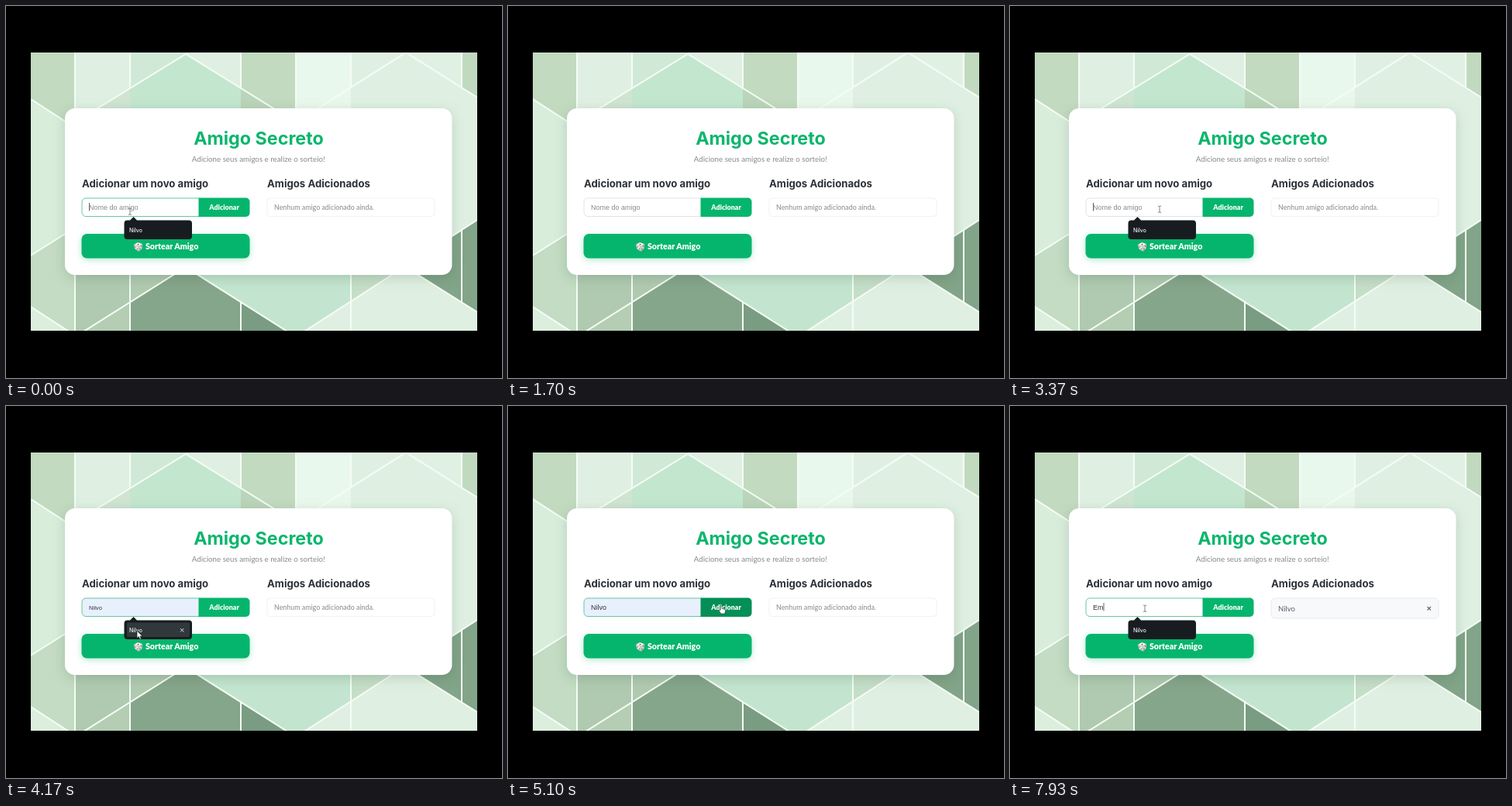
These frames come from a looping animation (640 px wide and 480 px high, 8000 ms). An HTML page:

```html
<!DOCTYPE html>
<html lang="pt">
<head>
<meta charset="utf-8">
<title>Amigo Secreto</title>
<style>
  html, body { margin: 0; width: 100%; height: 100%; overflow: hidden; background: #000; }
  svg { display: block; width: 640px; height: 480px; }
  text { font-family: Lato, sans-serif; white-space: pre; }
  .head { font: 700 13.2px Inter, sans-serif; fill: #2d3238; }
  .field { font: 9px "Liberation Sans", Arial, sans-serif; }
  .bold { font-weight: 900; fill: #fff; }
  #card { filter: drop-shadow(0 4px 8px #1b40282e); }
  #draw { filter: drop-shadow(0 2px 4px #06b56d50); }
</style>
</head>
<body>
<svg viewBox="0 0 640 480">
  <clipPath id="screen"><path d="M32 60H608V419H32Z"/></clipPath>
  <g clip-path="url(#screen)">
    <g id="wall"></g>
    <path fill="none" stroke="#f5fcf5" stroke-width="2" d="M89 60V420M160 60V106M160 347V420M303 60V106M303 381V420M374 60V150M445 60V105M445 340V420M588 60V106M588 289V383
      M32 120L89 157M89 150L232 62L374 150L516 60L608 118M32 322L89 286
      M89 427L232 337L374 427L608 276M32 388L89 425M516 337L608 395"/>

    <rect id="card" x="76" y="132" width="499.500" height="215" rx="13" fill="#fff"/>
    <text x="326" y="179" text-anchor="middle" style="font:700 23.300px Inter,sans-serif" fill="#0bb56d">Amigo Secreto</text>
    <text x="325.700" y="201" text-anchor="middle" font-size="9.750" fill="#858a8d">Adicione seus amigos e realize o sorteio!</text>
    <text class="head" x="98" y="234">Adicionar um novo amigo</text>
    <text class="head" x="337" y="234">Amigos Adicionados</text>

    <path id="input" d="M249 248H103a5 5 0 0 0-5 5v13.500a5 5 0 0 0 5 5H249"/>
    <text id="value" class="field" x="107" y="262.500"></text>
    <path id="caret" stroke="#666" stroke-width="1" d="M0 254V264.500"/>
    <path id="add" d="M248.500 247.500h61a5 5 0 0 1 5 5v14.500a5 5 0 0 1-5 5h-61z"/>
    <text class="bold" x="281.500" y="263" text-anchor="middle" font-size="8.900">Adicionar</text>

    <rect id="draw" x="97.500" y="294" width="217" height="31.500" rx="7" fill="#06b56d"/>
    <g stroke="#9aa6a3" stroke-width=".4">
      <path fill="#fff" d="M165 308l5-3 6 2-5 3.500z"/>
      <path fill="#e4e8e7" d="M165 308l6 2.500.5 6-5-3z"/>
      <path fill="#ced6d4" d="M171 310.500l5-3.500-.5 6-4 3.500z"/>
    </g>
    <g fill="#a8414b">
      <circle cx="170.500" cy="307.700" r="1"/><circle cx="167" cy="311" r=".7"/><circle cx="169.500" cy="313.500" r=".7"/>
      <circle cx="173" cy="313.500" r=".7"/><circle cx="174.500" cy="310" r=".7"/>
    </g>
    <text class="bold" x="180" y="314" font-size="10.600">Sortear Amigo</text>

    <g id="empty">
      <rect x="337" y="248" width="216" height="23.500" rx="4" fill="#fff" stroke="#f0f2f3"/>
      <text x="346" y="263" font-size="8.900" fill="#84898d">Nenhum amigo adicionado ainda.</text>
    </g>
    <g id="item">
      <rect x="337" y="248" width="216" height="26" rx="5" fill="#f8f9fa" stroke="#e7eaed"/>
      <text x="346" y="264.500" font-size="9.500" fill="#5c6166">Nilvo</text>
      <path stroke="#666c72" stroke-width="1.200" d="M538.500 259l4.500 4.500m0-4.500l-4.500 4.500"/>
    </g>

    <g id="popup">
      <path fill="#171c20" d="M156.500 276.500h3.500l4.500-4.500 4.500 4.500h67a4 4 0 0 1 4 4v16.500a4 4 0 0 1-4 4h-79.500a4 4 0 0 1-4-4v-16.500a4 4 0 0 1 4-4z"/>
      <g id="row">
        <rect x="156" y="279.500" width="81" height="18.500" rx="2" fill="#30383b"/>
        <path stroke="#d8dcde" d="M225 287l4.500 4.500m0-4.500l-4.500 4.500"/>
      </g>
      <text x="159" y="291.500" style="font:500 7px Inter,sans-serif" fill="#f2f4f5">Nilvo</text>
    </g>

    <g id="cursor">
      <path id="arrow" fill="#fff" stroke="#222" stroke-width=".7" d="M0 0V9.500L2.200 7.500 3.800 11 5.500 10.200 4 7H7Z"/>
      <path id="beam" fill="none" stroke="#777" stroke-width=".9" d="M-2-4Q0-4 0-3Q0-4 2-4M0-3V4M-2 4.500Q0 4.500 0 3.500Q0 4.500 2 4.500"/>
      <path id="hand" fill="#fff" stroke="#333" stroke-width=".6" d="M-1 0Q0-1.300 1 0V3.500L5 4.500Q6 5 5.500 7L4.500 10H0L-3 6Q-3 4.500-1 5.500Z"/>
    </g>
  </g>
</svg>
<script>
const $ = id => document.getElementById(id);
const LOOP = 8000, NAME = "Nilvo";

// Wallpaper panes: colour, then outline.
$("wall").innerHTML = `
  #dff0e2 M32 60H608V420H32Z
  #c2dabf M32 60H89V157L32 120Z
  #d0e9d6 M160 60H232V160H160Z
  #dff0e2 M232 60H303V160H232Z
  #c2dabf M303 60H374V150H303Z
  #e9f8ed M374 60H445V150H374Z
  #e0f1e3 M516 60H588V106Z
  #c1dabf M588 60H608V118L588 106Z
  #c3e6cf M89 150L232 62L374 150Z
  #cfe5d1 M89 150L160 106V150Z
  #bad5ba M303 106L374 150H303Z
  #d9eddb M32 120L89 157V286L32 322Z
  #c3dcc3 M32 322L89 286V420H32Z
  #afcab0 M89 286H160V420H89Z
  #b0cab0 M160 286H232V420H160Z
  #c3e5cf M232 337H445V420H232Z
  #c5dec8 M445 337H516V420H445Z
  #86a68b M160 382L232 337L374 427H160Z
  #b4cdb3 M89 427L160 382V427Z
  #7a9c82 M303 382L374 427H303Z
  #dcefdf M32 388L89 425H32Z
  #dff0e2 M374 427L516 337L608 395V427Z
  #82a488 M516 337L608 276V395Z`.trim().split("\n").map(line => {
    const [, fill, d] = line.trim().match(/(\S+) (.*)/);
    return `<path fill="${fill}" d="${d}"/>`;
  }).join("");

// Pointer stops: time, x, y.
const stops = [
  [0, 160, 265], [70, 160, 265], [870, 548, 178], [970, 614, 138], [1700, 614, 138],
  [1870, 567, 124], [2270, 567, 124], [2970, 193, 262], [3500, 193, 262], [4050, 169, 290],
  [4230, 169, 290], [4930, 275, 258], [5170, 275, 258], [5730, 174, 261], [LOOP, 174, 261]
];
const clamp = v => Math.max(0, Math.min(1, v));
const ramp = (t, start, length = 150) => clamp((t - start) / length);
const within = (t, a, b) => t >= a && t < b;
const show = (id, on) => $(id).style.display = on ? "" : "none";
const mix = (a, b, k) => `rgb(${a.map((v, i) => Math.round(v + (b[i] - v) * k))})`;

function pointer(t) {
  const i = stops.findIndex(s => s[0] > t), [t0, x0, y0] = stops[i - 1], [t1, x1, y1] = stops[i];
  const u = (t - t0) / (t1 - t0), k = u * u * (3 - 2 * u);
  return [x0 + (x1 - x0) * k, y0 + (y1 - y0) * k];
}

function caretOn(t) {
  if (t < 430 || t >= 7270) return true;
  if (within(t, 3340, 3870)) return true;
  return t >= 5140 && Math.floor((t - 5140) / 530) % 2 === 0;
}

function render(t) {
  const [x, y] = pointer(t);
  const overInput = x > 98 && x < 249 && y > 248 && y < 272;
  const overAdd = x >= 249 && x < 314 && y > 248 && y < 272;
  const popup = t < 430 || within(t, 3340, 4250) || t >= 5870;
  const overRow = popup && x > 153 && x < 239 && y > 278 && y < 300;
  const preview = overRow && t < 4250;
  const filled = preview || within(t, 4250, 5140);
  const typed = t >= 7900 ? "Em" : t >= 7770 ? "E" : "";
  const focus = t < 1000 ? 1 - ramp(t, 430) : ramp(t, 3370);

  $("cursor").setAttribute("transform", `translate(${x} ${y})`);
  show("beam", overInput);
  show("hand", overAdd);
  show("arrow", !overInput && !overAdd);

  $("input").setAttribute("fill", filled ? "#e8f0fe" : "#fff");
  $("input").setAttribute("stroke", mix([222, 229, 230], [103, 199, 160], focus));
  const value = $("value");
  value.textContent = filled ? NAME : typed || "Nome do amigo";
  value.setAttribute("fill", filled || typed ? "#333" : "#85898c");
  value.style.fontSize = preview ? "7.6px" : "9px";
  show("caret", caretOn(t) && !filled);
  $("caret").setAttribute("transform", `translate(${107.5 + (typed ? value.getComputedTextLength() : 0)} 0)`);

  const hover = t > 4500 ? ramp(t, 4780) * (1 - ramp(t, 5300)) : +overAdd;
  $("add").setAttribute("fill", mix([6, 181, 109], [4, 143, 86], hover));
  show("popup", popup);
  show("row", overRow);
  show("empty", t < 5140);
  show("item", t >= 5140);
  $("item").style.opacity = ramp(t, 5120);
}

const begin = performance.now();
function tick() {
  render((performance.now() - begin) % LOOP);
  requestAnimationFrame(tick);
}
tick();
</script>
</body>
</html>
```
